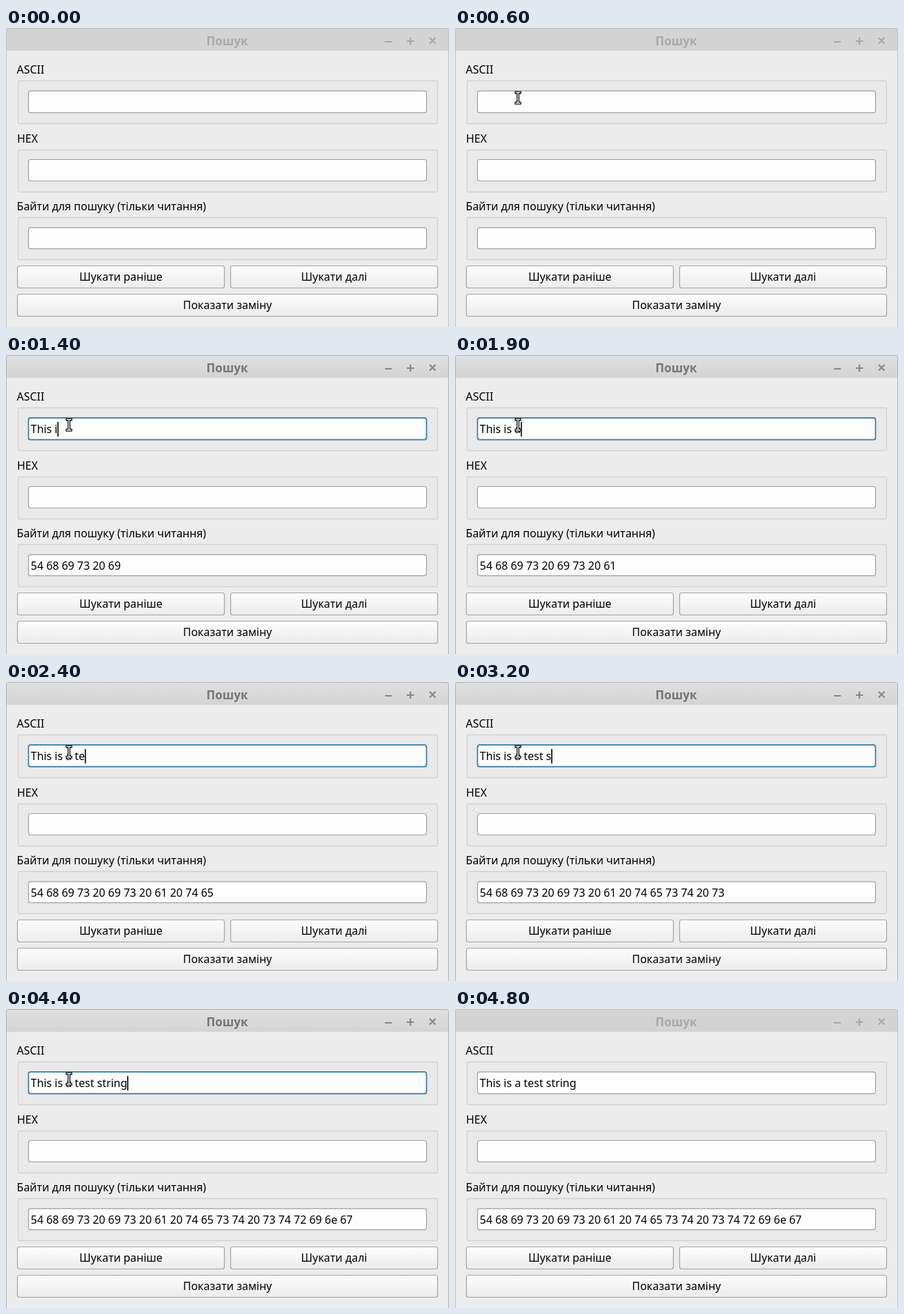
Write an HTML page that moves like this. It is 640 by 433 pixels and loops after 4900 ms.

```html
<!DOCTYPE html>
<html lang="uk">
<head>
<meta charset="utf-8">
<title>Пошук</title>
<style>
  html, body { margin: 0; width: 100%; height: 100%; overflow: hidden; background: #ececec; }
  svg { display: block; width: 640px; height: 433px; }
  text { font: 15.93px "Noto Sans", "Open Sans", sans-serif; fill: #000; white-space: pre; }
  .mid { text-anchor: middle; }
  .title { font-weight: 700; font-size: 17px; fill: #a9a9a9; }
  .icons { fill: none; stroke: #a6a6a6; stroke-width: 2.2; }
  .bar { fill: #d3d3d3; }
  .edge { fill: none; stroke: #c0c0c0; }
  .group { fill: #e9e9e9; stroke: #d0d0d0; stroke-width: 1.3; }
  .field { fill: #fdfdfd; stroke: #a0a0a0; stroke-width: 1.2; }
  .button { fill: url(#face); stroke: #a4a4a4; stroke-width: 1.2; }
  .caret, .pointer { visibility: hidden; }
  .caret { fill: #000; }
  .pointer { fill: none; stroke-linecap: square; }

  .active .title { fill: #757575; }
  .active .icons { stroke: #858585; }
  .active .bar { fill: url(#shade); }
  .active .edge { stroke: #b0b0b0; }
  .active #ascii { stroke: #3579a8; stroke-width: 1.7; }
  .active .caret, .hover .pointer { visibility: visible; }
</style>
</head>
<body>
<svg id="win" viewBox="0 0 640 433">
  <defs>
    <linearGradient id="shade" x2="0" y2="1">
      <stop stop-color="#e0e0e0"/><stop offset="1" stop-color="#d3d3d3"/>
    </linearGradient>
    <linearGradient id="face" x2="0" y2="1">
      <stop stop-color="#fdfdfd"/><stop offset="1" stop-color="#ebebeb"/>
    </linearGradient>
  </defs>

  <rect width="640" height="433" fill="#ececec"/>
  <rect class="bar" width="640" height="33"/>
  <path class="edge" d="M.5 433V5Q.5 .5 5 .5H635Q639.5 .5 639.5 5V433"/>
  <text class="title mid" x="319.5" y="25">Пошук</text>
  <path class="icons" d="M547.5 20H557.5M579 19H589.5M584.25 13.75V24.25M612 14L620.5 22.5M620.5 14L612 22.5"/>

  <text x="15.6" y="66">ASCII</text>
  <rect class="group" x="17.5" y="76.5" width="606" height="62" rx="2"/>
  <rect class="field" id="ascii" x="32.5" y="91.2" width="575" height="31.5" rx="3"/>
  <text id="typed" x="35.8" y="112.5" xml:space="preserve"></text>
  <rect class="caret" id="caret" y="97" width="1.6" height="21"/>

  <text x="16" y="166">HEX</text>
  <rect class="group" x="17.5" y="176.5" width="606" height="61" rx="2"/>
  <rect class="field" x="32.5" y="190.5" width="575" height="31" rx="3"/>

  <text x="15.6" y="264">Байти для пошуку (тільки читання)</text>
  <rect class="group" x="17.5" y="274.5" width="606" height="61" rx="2"/>
  <rect class="field" x="32.5" y="289.2" width="575" height="30.5" rx="3"/>
  <text id="bytes" x="35.8" y="310.6"></text>

  <rect class="button" x="16.5" y="344.5" width="299" height="32" rx="3"/>
  <text class="mid" x="166" y="366">Шукати раніше</text>
  <rect class="button" x="324.5" y="344.5" width="299" height="32" rx="3"/>
  <text class="mid" x="474" y="366">Шукати далі</text>
  <rect class="button" x="16.5" y="385.5" width="607" height="32" rx="3"/>
  <text class="mid" x="320" y="407">Показати заміну</text>

  <g class="pointer">
    <path d="M88.3 93.4H93.7M91 94V108.5M88.3 108.8H93.7" stroke="#111" stroke-width="4"/>
    <path d="M88.3 93.4H93.7M91 94V108.5M88.3 108.8H93.7" stroke="#fff" stroke-width="1.4"/>
  </g>
</svg>

<script>
  const LOOP = 4900, STEP = 100;
  const POINTER_IN = 600, FOCUS = 700, BLUR = 4800;
  const phrase = "This is a test string";
  // moment of each key press, ms
  const keys = [800, 900, 1000, 1000, 1200, 1400, 1500, 1700, 1900, 2100, 2200,
                2400, 2600, 2800, 3000, 3200, 3400, 3600, 3800, 4000, 4200];
  const [win, typed, bytes, caret] =
    ["win", "typed", "bytes", "caret"].map(id => document.getElementById(id));

  const toHex = s => [...s].map(c => c.charCodeAt(0).toString(16)).join(" ");

  function draw(now) {
    const t = Math.floor((now % LOOP) / STEP) * STEP;
    const text = phrase.slice(0, keys.filter(k => k <= t).length);
    typed.textContent = text;
    bytes.textContent = toHex(text);
    caret.setAttribute("x", 35.6 + (text ? typed.getComputedTextLength() : 0));
    win.classList.toggle("active", t >= FOCUS && t < BLUR);
    win.classList.toggle("hover", t >= POINTER_IN && t < BLUR);
  }

  function tick() {
    draw(performance.now());
    requestAnimationFrame(tick);
  }
  tick();
</script>
</body>
</html>
```
